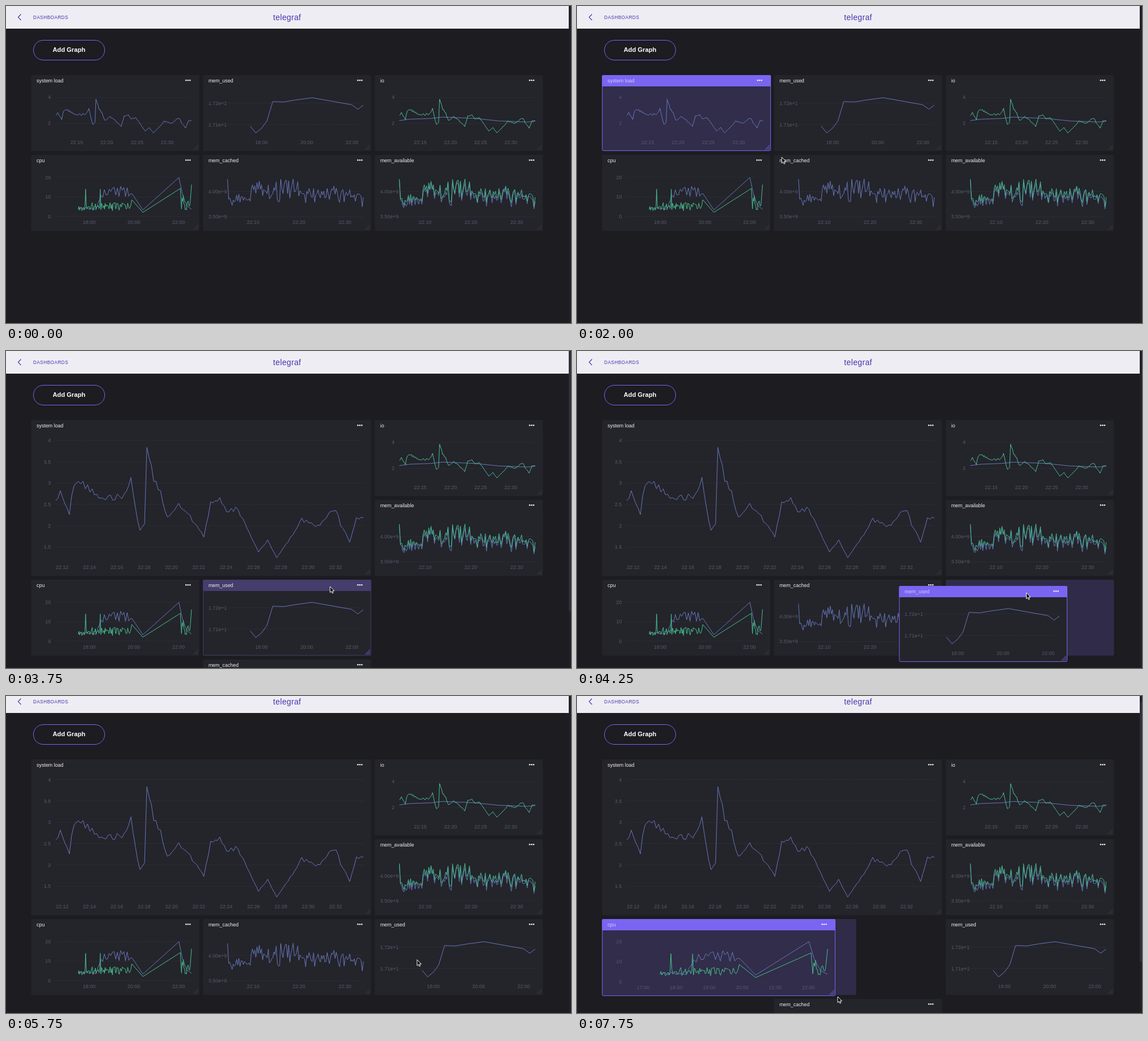
Animation, 999 px wide and 560 px high, one loop 8 s. Source, as an HTML page with a canvas:

```html
<!DOCTYPE html>
<html lang="en">
<head>
<meta charset="utf-8">
<title>Dashboard</title>
<style>
html, body { margin: 0; height: 100%; overflow: hidden; background: #1c1c21; }
canvas { display: block; }
</style>
</head>
<body>
<canvas id="stage" width="999" height="560"></canvas>
<script>
const ctx = document.getElementById('stage').getContext('2d');
const FONT = '"Liberation Sans", Arial, sans-serif';
const BLUE = '#6678ba', GREEN = '#46c08f', VIOLET = '#7a65f2', INK = '#4636b0';
const STEP = 250, LOOP = 8000;
const COL = 75.95, ROW = 35.25, GAP_X = 6.3, GAP_Y = 6.8, LEFT = 44.3, TOP = 122;

// Linear interpolation through keys [position, ...values]
function along(keys, at) {
  const i = keys.findIndex(p => p[0] >= at);
  if (i < 1) return keys[i < 0 ? keys.length - 1 : 0].slice(1);
  const a = keys[i - 1], b = keys[i], f = (at - a[0]) / (b[0] - a[0]);
  return a.slice(1).map((v, j) => v + (b[j + 1] - v) * f);
}

// ---------- data: points are [0..1 across, 0..1 up] ----------
let seed = 11;
const rnd = () => (seed = (seed * 16807) % 2147483647) / 2147483647;

// Samples a trend at equal steps and adds noise in proportion to its height
function series(keys, step, noise) {
  const points = [], end = keys[keys.length - 1][0];
  for (let x = keys[0][0]; x < end + step / 2; x += step) {
    const n = along(keys, x)[0] * (1 + noise * (rnd() + rnd() - 1));
    points.push([x, Math.min(1, Math.max(0, n))]);
  }
  return points;
}

const load = series([[0, .52], [2, .57], [6, .39], [8, .65], [12, .66], [20, .5], [30, .53], [33, .65],
  [37, .24], [39, .3], [40, 1], [43, .66], [46, .56], [49, .34], [54, .46], [60, .34], [65, .18], [68, .48],
  [72, .51], [75, .41], [80, .42], [89, .05], [93, .15], [97, 0], [104, .2], [108, .33], [116, .27],
  [122, .43], [129, .14], [132, .34], [135, .35]], 1, .08).map(([x, n]) => [x / 135, n]);

const ioWait = [[0, .35], [.08, .39], [.23, .41], [.32, .45], [.56, .41], [.73, .34], [.94, .31], [1, .33]];

const memUsed = [[.167, .19], [.208, 0], [.25, .13], [.29, .34], [.333, .89], [.415, .88],
  [.5, .935], [.623, 1], [.915, .8], [.96, .67], [1, .79]];

const memCached = series([[0, .83], [.01, .38], [.16, .36], [.19, .74], [.3, .66], [.33, .5], [.38, .7],
  [.5, .66], [.55, .53], [.685, .5], [.695, 1], [.705, .5], [.985, .53], [.995, .02], [1, .4]], 1 / 120, .6);
const memShadow = memCached.map(([x, n]) => [x, Math.max(0, n - rnd() * .14)]);

const cpuUser = [
  ...series([[.166, .13], [.3, .11], [.327, .5], [.42, .65], [.56, .58]], .012, .35),
  [.642, .08], [.907, 1], [.935, .5], [.965, .2], [1, .1]
];
const cpuSystem = [
  ...series([[.166, .12], [.216, .14], [.22, 1], [.2245, .15], [.265, .15], [.2695, .96], [.274, .17],
    [.322, .17], [.327, .65], [.332, .17], [.555, .18]], .0045, .9),
  [.56, .37], [.642, .01], [.918, .69],
  ...series([[.922, .34], [.99, .24]], .0045, .9), [1, .8]
];

// ---------- charts ----------
const plain = v => String(v), sci = v => v.toExponential(2);
const loadAxes = {
  lo: 1.24, hi: 3.94, label: plain, start: 1331.53, span: 22.5,
  yTicks: h => h > 200 ? [1.5, 4, .5] : [2, 4, 2], xStep: w => w > 450 ? 2 : 5
};
const memAxes = {
  lo: 3.573e9, hi: 4.27e9, label: sci, start: 1324.4, span: 29.63,
  yTicks: () => [3.5e9, 4e9, .5e9], xStep: () => 10
};
const charts = {
  load: { title: 'system load', ...loadAxes, lines: [[BLUE, load]] },
  used: {
    title: 'mem_used', lo: 17.0605, hi: 17.2237, label: sci, start: 990, span: 360,
    yTicks: () => [17.1, 17.2, .1], xStep: () => 120, lines: [[BLUE, memUsed]]
  },
  io: { title: 'io', ...loadAxes, lines: [[BLUE, ioWait], [GREEN, load]] },
  cpu: {
    title: 'cpu', lo: 1.75, hi: 19.7, label: plain, start: 990.3, span: 364.7,
    yTicks: () => [0, 20, 10], xStep: w => w > 330 ? 60 : 120, lines: [[BLUE, cpuUser], [GREEN, cpuSystem]]
  },
  cached: { title: 'mem_cached', ...memAxes, lines: [[BLUE, memCached]] },
  available: { title: 'mem_available', ...memAxes, lines: [[BLUE, memShadow], [GREEN, memCached]] }
};

// ---------- motion: keys are [step, x, y] or [step, width, height] ----------
const pointer = [[2, 984, 6], [4, 520, 536], [5, 54, 400], [7, 334, 249], [8, 362, 267], [11, 631, 389],
  [15, 573, 416], [16, 689, 424], [18, 900, 430], [20, 897, 422], [22, 850, 445], [26, 357.5, 528],
  [28, 336, 524], [31, 461, 531]];
const loadSize = [[8, 298.5, 134], [11, 597.7, 269]];
const cpuSize = [[28, 298, 134.2], [31, 412.6, 136]];

const cell = (c, r, w = 4, h = 4) =>
  ({ x: LEFT + c * COL, y: TOP + r * ROW, w: w * COL - GAP_X, h: h * ROW - GAP_Y });
const toCols = w => Math.round((w + GAP_X) / COL);
const toRows = h => Math.round((h + GAP_Y) / ROW);

function layout(k) {
  const [lw, lh] = along(loadSize, k), [cw, ch] = along(cpuSize, k);
  const cols = toCols(lw), rows = toRows(lh), cpuCols = toCols(cw);
  const wide = cols > 4, moved = k >= 17;
  const usedCol = moved ? 8 : k === 16 ? 5 : 4;
  const cachedRow = moved ? (cpuCols > 4 ? 12 : 8) : wide ? rows + 4 : 4;
  const panels = {
    load: cell(0, 0, cols, rows),
    used: cell(usedCol, moved ? 8 : wide ? rows : 0),
    io: cell(8, 0),
    cpu: cell(0, Math.max(4, rows), cpuCols),
    cached: cell(4, cachedRow),
    available: cell(8, 4)
  };
  let active = null, mode = '', hole = null;
  const grab = (id, how, change) => {
    active = id;
    mode = how;
    hole = { ...panels[id] };
    Object.assign(panels[id], change);
  };
  if (k >= 8 && k < 12) grab('load', 'resize', { w: lw, h: lh });
  if (k >= 16 && k < 21) {
    const [px, py] = along(pointer, k);
    grab('used', 'move', { x: px - 225, y: py - 12 });
  }
  if (k >= 28) grab('cpu', 'resize', { w: cw, h: ch });
  if (k === 7) [active, mode] = ['load', 'hover'];
  if (k === 15) [active, mode] = ['used', 'hover'];
  return { panels, active, mode, hole, overflow: cachedRow > 8 };
}

// ---------- drawing ----------
function text(str, x, y, size, color, align = 'left', weight = '', spacing = 0) {
  ctx.font = `${weight} ${size}px ${FONT}`;
  ctx.letterSpacing = spacing + 'px';
  ctx.textAlign = align;
  ctx.fillStyle = color;
  ctx.fillText(str, x, y);
}

function box(x, y, w, h, r, fill, stroke) {
  ctx.beginPath();
  ctx.roundRect(x, y, w, h, r);
  if (fill) { ctx.fillStyle = fill; ctx.fill(); }
  if (stroke) { ctx.strokeStyle = stroke; ctx.lineWidth = 1; ctx.stroke(); }
}

function line(points, color, width = 1) {
  ctx.beginPath();
  points.forEach(p => ctx.lineTo(...p));
  ctx.strokeStyle = color;
  ctx.lineWidth = width;
  ctx.stroke();
}

const clock = m => [m / 60 | 0, m % 60].map(v => String(v).padStart(2, '0')).join(':');

function drawChart(c, { x, y, w, h }) {
  const x0 = x + 43.6, pw = w - 57.4, bottom = y + h - 32, ph = h - 72;
  const tickColor = '#585a6b';
  const [first, last, step] = c.yTicks(h);
  for (let v = first; v <= last * 1.0001; v += step) {
    const ty = bottom - (v - c.lo) / (c.hi - c.lo) * ph, label = c.label(v);
    ctx.setLineDash([1, 2]);
    line([[x0, Math.round(ty) + .5], [x0 + pw, Math.round(ty) + .5]], '#3a3a46');
    ctx.setLineDash([]);
    ctx.font = `9px ${FONT}`;
    ctx.letterSpacing = '0px';
    text(label, Math.max(x + 9.6, x + 35 - ctx.measureText(label).width), ty + 3.6, 9, tickColor);
  }
  const gap = c.xStep(w);
  for (let m = Math.ceil(c.start / gap) * gap; m < c.start + c.span * .95; m += gap)
    text(clock(m), x0 + (m - c.start) / c.span * pw, y + h - 12.5, 9, tickColor, 'center');
  for (const [color, points] of c.lines)
    line(points.map(([px, n]) => [x0 + px * pw, bottom - n * ph]), color);
}

function drawPanel(c, p, mode) {
  const { x, y, w, h } = p, held = mode === 'resize' || mode === 'move';
  box(x, y, w, h, 2, mode === 'resize' ? '#312d4a' : '#24242b');
  if (mode) {
    const tint = held ? VIOLET : '#453d6c';
    box(x, y, w, 20, [2, 2, 0, 0], tint);
    box(x + .5, y + .5, w - 1, h - 1, 2, null, tint);
  }
  text(c.title, x + 9.8, y + 12.6, 8.9, held ? '#d2caff' : '#eeeef2');
  ctx.fillStyle = '#f4f4f8';
  for (let i = -1; i < 2; i++) {
    ctx.beginPath();
    ctx.arc(x + w - 20 + i * 3.5, y + 9.3, 1.3, 0, 7);
    ctx.fill();
  }
  drawChart(c, p);
  for (const d of [9, 6, 3])
    line([[x + w - 1.5 - d, y + h - 2], [x + w - 2, y + h - 1.5 - d]], mode ? VIOLET : '#3b3b46');
}

const arrow = new Path2D('M0 0V10.6L2.4 8.4 4 12 5.7 11.2 4.1 7.8H7.4Z');

function drawPointer(x, y) {
  ctx.save();
  ctx.translate(x, y);
  ctx.fillStyle = '#000';
  ctx.fill(arrow);
  ctx.strokeStyle = '#fff';
  ctx.lineWidth = 1;
  ctx.stroke(arrow);
  ctx.restore();
}

function draw(k) {
  const { panels, active, mode, hole, overflow } = layout(k);
  const scroll = k >= 23 ? 10 : 0;
  ctx.fillStyle = '#1c1c21';
  ctx.fillRect(0, 0, 999, 560);
  ctx.save();
  ctx.translate(0, -scroll);
  ctx.fillStyle = '#eeedf3';
  ctx.fillRect(0, 0, 995, 40);
  line([[26.5, 14.5], [21.5, 19.8], [26.5, 25]], INK, 1.2);
  text('DASHBOARDS', 48, 23, 8.2, INK, 'left', '', .48);
  text('telegraf', 472.3, 25, 14, INK, 'left', '', .35);
  box(48.5, 60.5, 126, 35, 17.5, null, VIOLET);
  text('Add Graph', 82.5, 80.8, 11.2, '#fff', 'left', 'bold');
  if (hole) box(hole.x, hole.y, hole.w, hole.h, 2, '#302b49');
  for (const id in panels) if (id !== active) drawPanel(charts[id], panels[id], '');
  if (active) drawPanel(charts[active], panels[active], mode);
  ctx.restore();
  ctx.fillStyle = '#202027';
  ctx.fillRect(995, 0, 4, 560);
  if (overflow) box(995, scroll, 4, 460, 2, '#2f2f3a');
  if (k >= 2) drawPointer(...along(pointer, k));
}

function tick() {
  draw(Math.floor(performance.now() % LOOP / STEP));
  requestAnimationFrame(tick);
}
tick();
</script>
</body>
</html>
```
